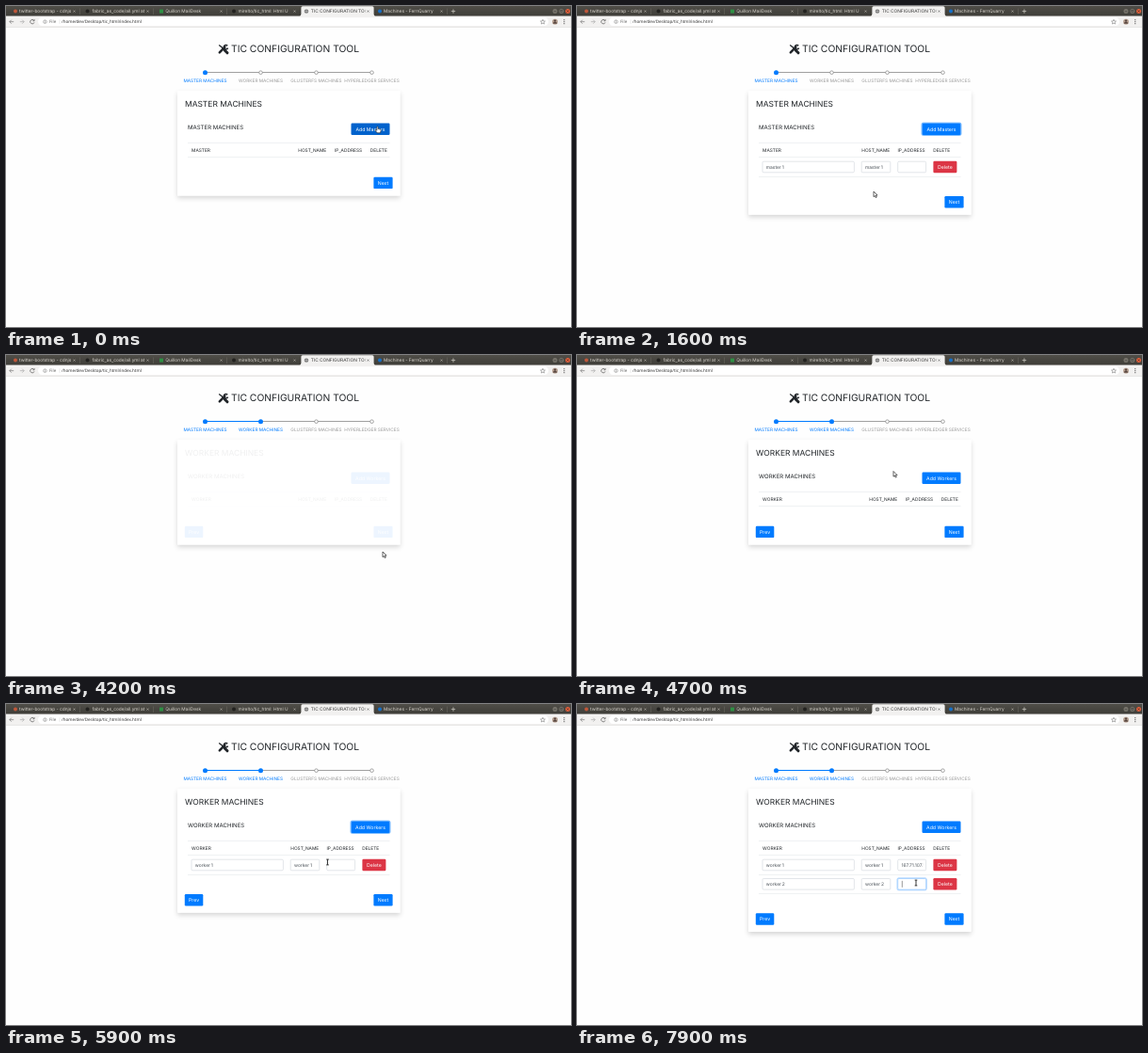
An HTML page that plays this animation: 600 by 341 pixels, repeating every 8000 ms.

```html
<!DOCTYPE html>
<html lang="en">
<head>
<meta charset="utf-8">
<title>TIC Configuration Tool</title>
<style>
html, body { margin: 0; width: 100%; height: 100%; overflow: hidden; background: #fefefe; }
svg { display: block; width: 600px; height: 341px; font-family: Inter, sans-serif; text-rendering: geometricPrecision; }
#browser { font-family: "Noto Sans", sans-serif; }
</style>
</head>
<body>
<svg viewBox="0 0 600 341">
  <defs>
    <filter id="shadow" x="-10%" y="-10%" width="120%" height="130%">
      <feDropShadow dx="0" dy="2.5" stdDeviation="2.5" flood-opacity=".16"/>
    </filter>
    <linearGradient id="strip" x2="0" y2="1">
      <stop stop-color="#504e48"/><stop offset="1" stop-color="#3d3c37"/>
    </linearGradient>
  </defs>
  <rect width="600" height="341" fill="#fefefe"/>
  <g id="browser"></g>
  <g id="heading"></g>
  <g id="page"></g>
</svg>
<script>
const LOOP = 8000, TICK = 100;
const BLUE = '#007bff', RED = '#dc3545', INK = '#212529';
const IP = '167.71.107.171';
const $ = id => document.getElementById(id);

// Drawing helpers
const text = (x, y, s, size, fill = INK, anchor = 'start', more = '') =>
  `<text x="${x}" y="${y}" font-size="${size}" fill="${fill}" text-anchor="${anchor}" ${more}>${s}</text>`;
const rect = (x, y, w, h, fill, more = '') =>
  `<rect x="${x}" y="${y}" width="${w}" height="${h}" fill="${fill}" ${more}/>`;
const circle = (x, y, r, fill, more = '') =>
  `<circle cx="${x}" cy="${y}" r="${r}" fill="${fill}" ${more}/>`;
const path = (d, stroke, width = .8, fill = 'none', more = '') =>
  `<path d="${d}" stroke="${stroke}" stroke-width="${width}" fill="${fill}" ${more}/>`;
const cross = (x, y, r, color) =>
  path(`M${x - r} ${y - r}l${2 * r} ${2 * r}m0 ${-2 * r}l${-2 * r} ${2 * r}`, color, .6);

function drawBrowser() {
  // Title, icon colour, icon x, title x
  const tabs = [
    ['twitter-bootstrap - cdnjs', '#c0573a', 10, 14],
    ['fabric_as_code/all.yml at', '#22211f', 86.5, 91.5],
    ['Quillon MailDesk', '#2f8f44', 165, 169.3],
    ['mirelto/tic_html: Html U', '#22211f', 242, 246.5],
    ['TIC CONFIGURATION TOOL', '', 319, 323.8],
    ['Machines - FernQuarry', '#1670c8', 397, 401],
  ];
  let out = rect(0, 0, 600, 11, 'url(#strip)') + rect(0, 10.6, 600, 11.9, '#f2f1f0') + rect(0, 22, 600, .6, '#dedcda');
  tabs.forEach(([name, color, iconX, left], i) => {
    const x = 1 + 78 * i, active = !color;
    if (active) out += path(`M${x - 1} 11q1.2 -.6 1.4-2.4v-6.8q.2-1.5 1.6-1.5h74q1.4 0 1.6 1.5v6.8q.2 1.8 1.4 2.4z`, 'none', 0, '#f2f1f0');
    else if (i !== 3) out += rect(x + 77, 2.5, .5, 6.5, '#6d6a63');
    if (active) out += circle(iconX, 5.6, 2.2, '#666') + path(`M${iconX - 2.2} 5.6h4.4m-2.2-2.2v4.4`, '#ddd', .5);
    else if (i === 2) out += rect(iconX - 2, 3.6, 4, 4, color);
    else out += circle(iconX, 5.6, 2, color);
    out += `<svg x="${left}" y="0" width="${x + 68.5 - left}" height="11">` +
      text(0, 7.3, name, 4.8, active ? '#333' : '#dcd8d0') + '</svg>' +
      cross(x + 71.5, 5.6, 1, active ? '#555' : '#c4c0b8');
  });
  out += path('M472.8 5.6h4.4m-2.2-2.2v4.4', '#d8d5cd', .7);
  [583, 589.8, 596.6].forEach((x, i) => out += circle(x, 5.5, 2.5, i === 2 ? '#e0603c' : '#77746b'));
  out += path('M581.8 5.8h2.4', '#333', .6) + rect(588.8, 4.5, 2, 2, 'none', 'stroke="#333" stroke-width=".5"') + cross(596.6, 5.5, 1, '#402018');

  out += path('M8.2 16.7h-4.4m2-2l-2 2l2 2', '#777', .7) + path('M14.8 16.7h4.4m-2-2l2 2l-2 2', '#aaa', .7) +
    path('M29.7 15.4a2.2 2.2 0 1 0 .3 2m.1-3.3v1.7h-1.7', '#555', .7) +
    rect(34, 12.3, 542, 8.6, '#fff', 'rx="4.3"') +
    circle(41.4, 16.7, 1.8, 'none', 'stroke="#777" stroke-width=".5"') + path('M41.4 16.2v1.6m0-2.6v.5', '#777', .5) +
    text(46, 18.3, 'File', 4.5, '#666') + rect(56.8, 14.2, .4, 5, '#ccc') +
    text(59, 18.3, '/home/dev/Desktop/tic_html/index.html', 4.5, '#333') +
    path('M570 14.3l.7 1.7 1.8 .1-1.4 1.2.5 1.8-1.6-1-1.6 1 .5-1.8-1.4-1.2 1.8-.1z', '#666', .5) +
    circle(583, 16.7, 3, '#b9a394') + circle(583, 15.6, 1.2, '#5c4a43') + path('M580.8 18.7a2.2 2 0 0 1 4.4 0z', 'none', 0, '#5c4a43');
  for (let i = 0; i < 3; i++) out += circle(592.8, 14.7 + i * 2, .6, '#555');
  $('browser').innerHTML = out;
}

function drawHeading() {
  const tools = path('M226.2 41.4l2.6 2.2 5 5', INK, 1.3) + path('M232.2 47l2.8 2.8', INK, 3, 'none', 'stroke-linecap="round"') +
    path('M226.8 49.3l5.6-5.6', INK, 2.5, 'none', 'stroke-linecap="round"') +
    path('M235.2 42.2a2.2 2.2 0 1 0 .4 2.5', INK, 1.6);
  $('heading').innerHTML = tools + text(239, 49.3, 'TIC CONFIGURATION TOOL', 10.32);
}

// Pointer track: time, x, y
const track = [
  [0, 394.5, 128], [100, 402, 129.5], [200, 402, 129.5], [300, 399, 131], [500, 399, 131], [600, 394, 131], [1200, 394, 131],
  [1600, 315, 197], [2000, 353, 171], [3200, 353, 171], [3300, 404, 160], [3600, 497, 234], [3700, 497, 234],
  [4100, 400, 209], [4200, 400, 209], [4700, 336, 123.5], [5000, 384, 131], [5500, 384, 131], [5900, 341.5, 168],
  [6100, 347, 171], [6400, 347, 171], [6900, 382, 133], [7300, 382, 133], [7500, 360, 190], [8000, 360, 190],
];
// Focus changes: time, focused control
const focusLog = [
  [0, ''], [1300, 'add'], [2300, 'ip0'], [3700, ''], [5300, 'add'], [6100, 'ip0'], [7100, 'add'], [7700, 'ip1'],
];

function pointerAt(t) {
  const i = track.findIndex(k => k[0] > t), [t0, x0, y0] = track[i - 1], [t1, x1, y1] = track[i];
  const p = (t - t0) / (t1 - t0);
  return { x: x0 + (x1 - x0) * p, y: y0 + (y1 - y0) * p };
}

function stateAt(t) {
  const worker = t >= 4200;
  const [since, focus] = focusLog.filter(f => f[0] <= t).pop();
  const filledAt = worker ? 6400 : 3100;
  const filled = t >= filledAt;
  const typedAt = filled ? Math.max(since, filledAt) : since;
  const fade = Math.min(1, (t - 4100) / 600);
  return {
    worker, focus, filled,
    rows: worker ? (t >= 5300) + (t >= 7200) : +(t >= 1300),
    ring: Math.min(1, (t - since + TICK) / 300),
    caret: Math.floor((t - typedAt) / 600) % 2 === 0,
    opacity: worker ? .5 - Math.cos(Math.PI * fade) / 2 : 1,
    pointer: pointerAt(t),
  };
}

function draw(t) {
  const s = stateAt(t), { x: px, y: py } = s.pointer;
  const kind = s.worker ? 'worker' : 'master', KIND = kind.toUpperCase();
  const grow = s.rows * 20.3;
  let cursor = 'arrow';

  const over = (x, y, w, h, shape) => {
    const hit = px >= x && px <= x + w && py >= y && py <= y + h;
    if (hit) cursor = shape;
    return hit;
  };
  const button = (x, y, w, label, color = BLUE, focused = false) => {
    const hover = over(x, y, w, 12.4, 'hand');
    const fill = !hover ? color : color === RED ? '#c82333' : '#0062cc';
    return (focused ? rect(x - .5, y - .5, w + 1, 13.4, 'none', `rx="1.6" stroke="#268fff" stroke-width="1" opacity="${.6 * s.ring}"`) : '') +
      rect(x, y, w, 12.4, fill, 'rx="1.2"') + text(x + w / 2, y + 8.1, label, 5.2, '#fff', 'middle');
  };
  const input = (x, y, w, value, focused = false) => {
    over(x, y, w, 12, 'beam');
    const scrolled = focused && value === IP;
    const caretX = scrolled ? w - 4 : 4.4;
    return (focused ? rect(x - .5, y - .5, w + 1, 13, 'none', `rx="1.6" stroke="${BLUE}" stroke-width="1" opacity="${.3 * s.ring}"`) : '') +
      rect(x + .2, y + .2, w - .4, 11.6, '#fff', `rx="1.2" stroke="${focused ? '#80bdff' : '#ced4da'}" stroke-width=".6"`) +
      `<svg x="${x + 4}" y="${y}" width="${w - 7.5}" height="12">` +
      text(scrolled ? w - 8.4 : 0, 7.9, value, 4.9, '#495057', scrolled ? 'end' : 'start', 'word-spacing="-.4"') + '</svg>' +
      (focused && s.caret ? rect(x + caretX, y + 2.5, .5, 7, '#333') : '');
  };
  const rule = y => rect(193, y, 214.5, .5, '#dee2e6');

  let steps = rect(211.5, 70, 177, 1, '#a0a0a0');
  if (s.worker) steps += rect(211.5, 70, 59, 1, BLUE);
  ['MASTER MACHINES', 'WORKER MACHINES', 'GLUSTERFS MACHINES', 'HYPERLEDGER SERVICES'].forEach((name, i) => {
    const x = 211.5 + i * 59, on = i <= +s.worker;
    steps += on ? circle(x, 70.7, 2.5, BLUE) : circle(x, 70.7, 1.8, '#fff', 'stroke="#8c8c8c" stroke-width=".8"');
    steps += text(x, 80.7, name, 4.78, on ? BLUE : '#999', 'middle');
  });

  const cols = s.rows ? [197, 302.3, 340.5, 378.2] : [197, 310.3, 349, 386.8];
  let body = text(190, 107, KIND + ' MACHINES', 8.46) +
    text(193, 131, KIND + ' MACHINES', 6.1) +
    button(366.5, 124.6, 41, `Add ${s.worker ? 'Workers' : 'Masters'}`, BLUE, s.focus === 'add') +
    rule(145) + rule(160.3);
  [KIND, 'HOST_NAME', 'IP_ADDRESS', 'DELETE'].forEach((h, i) => body += text(cols[i], 154.7, h, 4.85));
  for (let r = 0; r < s.rows; r++) {
    const y = 165 + r * 20.3, name = `${kind} ${r + 1}`;
    body += input(196.8, y, 97.8, name) + input(302, y, 31, name) +
      input(340.5, y, 30.3, r === 0 && s.filled ? IP : '', s.focus === 'ip' + r) +
      button(378.4, y - .2, 25, 'Delete', RED) + rule(181 + r * 20.3);
  }
  body += button(390.4, 181.7 + grow, 20.2, 'Next');
  if (s.worker) body += button(189.8, 181.7 + grow, 19.5, 'Prev');

  const shapes = {
    arrow: path('M0 0v5.7l1.3-1.2 1 2.1 1-.5-1-2h1.8z', '#222', .7, '#fff'),
    hand: path('M-.6 .3q.6-.7 1.2 0v2.2l2.4.6q.7.3.6 1.1l-.6 2.6h-3.4l-2-2.7q.2-.9 1.1-.4l.7.6z', '#222', .6, '#fff'),
    beam: path('M-1.3-2.9h2.6m-1.3 0v5.8m-1.3 0h2.6', '#222', .9),
  };
  $('page').innerHTML = steps +
    rect(182, 90.3, 236.5, 111.2 + grow, '#fff', 'rx="1.2" filter="url(#shadow)"') +
    `<g opacity="${s.opacity}">${body}</g>` +
    `<g transform="translate(${px} ${py})">${shapes[cursor]}</g>`;
}

drawBrowser();
drawHeading();
let shown = -1;
function frame() {
  const t = Math.floor(performance.now() % LOOP / TICK) * TICK;
  if (t !== shown) draw(shown = t);
  requestAnimationFrame(frame);
}
frame();
</script>
</body>
</html>
```
